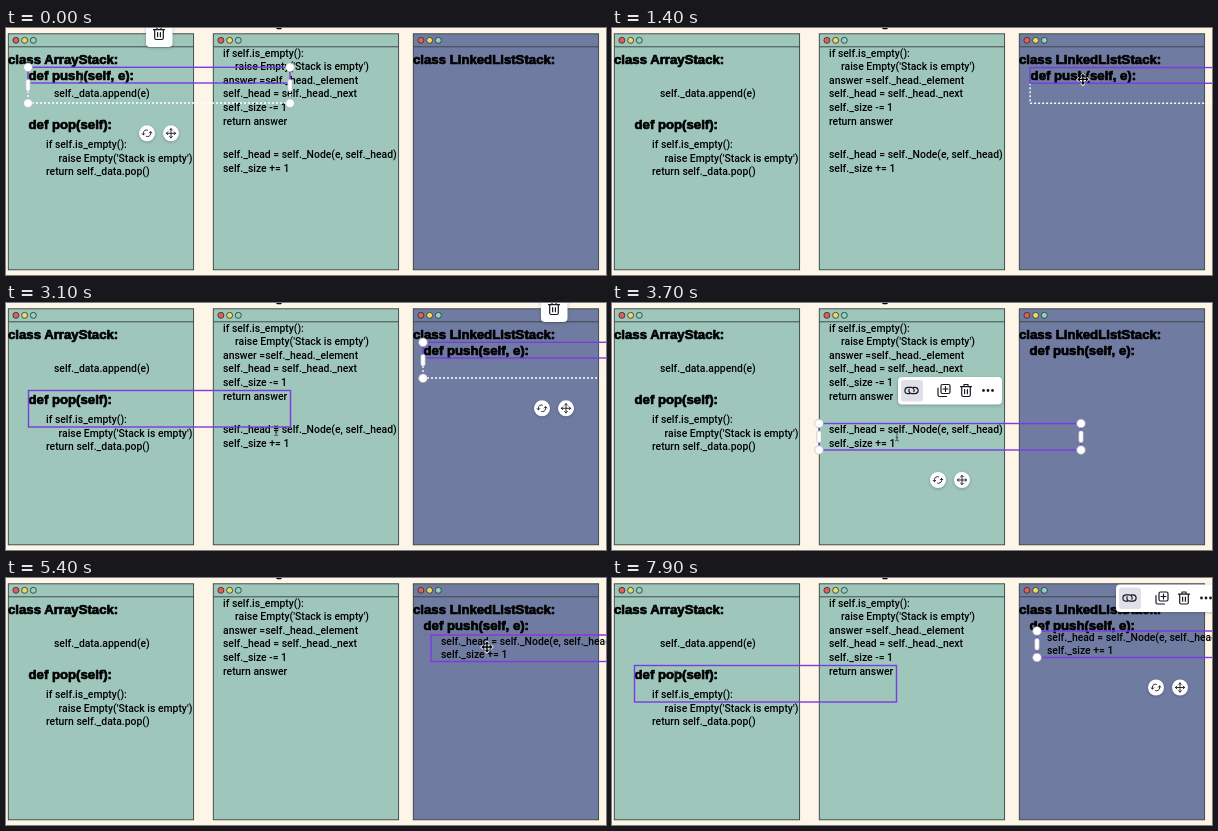
These frames come from a looping animation (600 px wide and 247 px high, 8000 ms). An HTML page:

```html
<!DOCTYPE html>
<html lang="en">
<head>
<meta charset="utf-8">
<title>Stack classes</title>
<style>
  html, body { margin: 0; width: 100%; height: 100%; overflow: hidden; background: #fdf5e8; }
  svg { display: block; width: 100vw; height: 100vh; }
  text { white-space: pre; }
  .code { font: 500 10.4px Roboto, sans-serif; fill: #000; }
  .head { font: 700 13.2px "Liberation Sans", Arial, sans-serif; fill: #000;
          stroke: #000; stroke-width: .7; stroke-linejoin: round; }
  .box { fill: none; stroke: #7a3be0; stroke-width: 1.4; }
  .dash { fill: none; stroke: #fff; stroke-width: 1.4; stroke-dasharray: 2 2; }
  .knob { fill: #fff; stroke: #a9b3b8; stroke-width: .6; }
  .guide { fill: none; stroke: #c42fc4; stroke-width: 1.1; stroke-dasharray: 2.5 1.2; }
  .card { fill: #fff; filter: drop-shadow(0 1px 1.5px rgba(30, 40, 60, .3)); }
  .icon { fill: none; stroke: #16191f; stroke-width: 1.2; stroke-linecap: round; stroke-linejoin: round; }
  .thin { stroke-width: .9; }
</style>
</head>
<body>
<svg id="stage" viewBox="0 0 600 247" preserveAspectRatio="none">
  <defs>
    <g id="trash" class="icon">
      <path d="M-5.5-3.8H5.5M-2-3.8V-6H2V-3.8M-4.3-3.8V4.5Q-4.3 6-2.8 6H2.8Q4.3 6 4.3 4.5V-3.8M-1.4-1V3.2M1.4-1V3.2"/>
    </g>
    <g id="link" class="icon">
      <path d="M-2 3.2H-3.4A3.2 3.2 0 0 1-3.4-3.2H-.4A3.2 3.2 0 0 1 2.4 1.2M2-3.2H3.4A3.2 3.2 0 0 1 3.4 3.2H.4A3.2 3.2 0 0 1-2.4-1.2"/>
    </g>
    <g id="copy" class="icon">
      <path d="M-1.5-6H4.5Q6-6 6-4.5V1.5Q6 3 4.5 3H-1.5Q-3 3-3 1.5V-4.5Q-3-6-1.5-6ZM-6-2.5V4.5Q-6 6-4.5 6H2.5M1.5-4V1M-1-1.5H4"/>
    </g>
    <g id="turn">
      <circle class="card" r="8"/>
      <path class="icon thin" d="M-3.6 1.5V-.5A3 3 0 0 1 .5-3.2M-4.8.3-3.6 1.6-2.3.3M3.6-1.5V.5A3 3 0 0 1-.5 3.2M4.8-.3 3.6-1.6 2.3-.3"/>
    </g>
    <path id="arrows" d="M-4.6 0H4.6M0-4.6V4.6M-3.2-1.4-4.6 0-3.2 1.4M3.2-1.4 4.6 0 3.2 1.4M-1.4-3.2 0-4.6 1.4-3.2M-1.4 3.2 0 4.6 1.4 3.2"/>
    <g id="shift">
      <circle class="card" r="8"/>
      <use href="#arrows" class="icon thin"/>
    </g>
  </defs>

  <rect width="600" height="247" fill="#fdf5e8"/>
  <path d="M270 0H276L275 1.2H271Z"/>
  <g id="panels"></g>
  <g id="copyText"></g>
  <rect id="hover" class="box"/>
  <g id="picks"></g>
  <path id="rowGuide" class="guide" d="M37 59.5H600"/>
  <path id="snapGuide" class="guide" d="M417 57H600" stroke-opacity=".6"/>
  <g id="cursor">
    <path id="arrow" d="M0 0V9L2 7.2 3.5 10.6 5 10 3.6 6.6H6.2Z" fill="#000" stroke="#fff" stroke-width=".5"/>
    <path id="beam" d="M-2-5Q0-5 0-3.7V3.7Q0 5-2 5M2-5Q0-5 0-3.7M0 3.7Q0 5 2 5M-1.2 1.6H1.2" fill="none" stroke="#333" stroke-width=".8"/>
    <g id="move" fill="none">
      <use href="#arrows" stroke="#fff" stroke-width="3"/>
      <use href="#arrows" stroke="#000" stroke-width="1.4"/>
    </g>
  </g>
</svg>
<script>
const LOOP = 8000, HOVER_LAG = 150;
const $ = id => document.getElementById(id);
const show = (el, on) => el.setAttribute("display", on ? "inline" : "none");
const place = (el, [x, y]) => el.setAttribute("transform", `translate(${x} ${y})`);

const TOP = 5.8, WIDE = 185.3, TALL = 236;
const panels = [[2.3, "#9fc6bb"], [207.3, "#9fc6bb"], [407.3, "#6f7ba0"]];
$("panels").innerHTML = panels.map(([x, fill]) => `
  <rect x="${x}" y="${TOP}" width="${WIDE}" height="${TALL}" fill="${fill}" stroke="#35423f" stroke-width=".9"/>
  <path d="M${x} 18.8H${x + WIDE}" stroke="#35423f" stroke-width=".9"/>` +
  ["#dd5f57", "#e6db68", "#8fd3bf"].map((dot, i) =>
    `<circle cx="${x + 7.6 + i * 8.7}" cy="12.3" r="3" fill="${dot}" stroke="#26302e" stroke-width=".8"/>`
  ).join("")).join("");

const line = (cls, x, y, s) => `<text class="${cls}" x="${x}" y="${y}">${s}</text>`;
const code = (x, y, s) => line("code", x, y, s);
const head = (x, y, s) => line("head", x, y, s);

$("copyText").innerHTML = [
  head(2, 36, "class ArrayStack:"),
  code(48, 69, "self._data.append(e)"),
  head(22.5, 101, "def pop(self):"),
  code(40, 120, "if self.is_empty():"),
  code(52.5, 133.5, "raise Empty('Stack is empty')"),
  code(40, 147, "return self._data.pop()"),
  code(217, 28.5, "if self.is_empty():"),
  code(229, 42, "raise Empty('Stack is empty')"),
  code(217, 55.5, "answer =self._head._element"),
  code(217, 69, "self._head = self._head._next"),
  code(217, 82.7, "self._size -= 1"),
  code(217, 96.5, "return answer"),
  head(407, 36, "class LinkedListStack:"),
  `<g id="push">${head(22.5, 52, "def push(self, e):")}</g>`,
  `<g id="node">${code(217, 130, "self._head = self._Node(e, self._head)")}
    ${code(217, 143.5, "self._size += 1")}</g>`
].join("");

// Selection frames: outline always, controls only while not dragging.
function controls(x, y, w, h, bar) {
  const knobs = [x, x + w].map(k => [y, y + h].map(v =>
    `<circle class="knob" cx="${k}" cy="${v}" r="4.3"/>`).join("") +
    `<rect class="knob" x="${k - 2.2}" y="${y + h / 2 - 6}" width="4.4" height="12" rx="2.2"/>`).join("");
  const mid = x + w / 2, low = y + h + 30;
  return `${knobs}<use href="#turn" x="${mid - 12}" y="${low}"/>
    <use href="#shift" x="${mid + 12}" y="${low}"/>${bar}`;
}
const pushBar = `<rect class="card" x="140" y="-8" width="26.5" height="27" rx="4"/>
  <use href="#trash" x="153" y="5.5"/>`;
const nodeBar = `<rect class="card" x="286" y="74" width="104" height="27.5" rx="4"/>
  <rect x="289" y="77" width="22" height="21.5" rx="3" fill="#dfe0ea"/>
  <use href="#link" x="299.5" y="87.5"/><use href="#copy" x="332" y="87.5"/>
  <use href="#trash" x="354" y="87.5"/>` +
  [371.5, 376, 380.5].map(x => `<circle cx="${x}" cy="87.5" r="1.4" fill="#16191f"/>`).join("");

$("picks").innerHTML = `
  <g id="pushPick"><path class="dash" d="M22 55V75H284V55"/>
    <rect class="box" x="22" y="39.3" width="262" height="15.7"/>
    <g id="pushTools">${controls(22, 39.3, 262, 36, pushBar)}</g></g>
  <g id="nodePick"><rect class="box" x="207" y="120.5" width="262" height="26.5"/>
    <g id="nodeTools">${controls(207, 120.5, 262, 26.5, nodeBar)}</g></g>`;

// Rows: time, x, y
const pushPath = [[100, 0, 0], [650, 406, 2.5], [1000, 406, 2.5], [1500, 395, 0]];
const nodePath = [[4250, 0, 0], [5150, 218, -63.5], [5450, 218, -63.5], [5650, 218, -67.5]];
const mousePath = [
  [100, 75, 50], [650, 479, 55], [1000, 479, 55], [1500, 470, 51], [2000, 470, 51],
  [2400, 190, 70], [2600, 165, 84], [2750, 165, 90], [3200, 285, 133], [3800, 285, 133],
  [4050, 263, 132], [4250, 263, 132], [5150, 481, 69], [5450, 481, 69], [5650, 481, 65],
  [6200, 481, 65], [6480, 196, 59], [6700, 192.5, 56], [7000, 150, 80], [7500, 72, 97], [7900, 64, 98]
];

function along(rows, t) {
  const next = rows.findIndex(r => r[0] > t);
  if (next === 0) return rows[0].slice(1);
  if (next < 0) return rows[rows.length - 1].slice(1);
  const a = rows[next - 1], b = rows[next];
  const u = (t - a[0]) / (b[0] - a[0]), e = u * u * (3 - 2 * u);
  return [1, 2].map(i => a[i] + (b[i] - a[i]) * e);
}

const inside = ([px, py], [x, y, w, h]) => px >= x && px <= x + w && py >= y && py <= y + h;

function draw(t) {
  const push = along(pushPath, t), node = along(nodePath, t), mouse = along(mousePath, t);
  const pushDrag = t > 50 && t < 1850, nodeDrag = t >= 4250 && t < 5680;
  const picked = t < 3250 ? "push" : "node";

  place($("push"), push);
  place($("pushPick"), push);
  place($("node"), node);
  place($("nodePick"), node);
  show($("pushPick"), picked === "push");
  show($("nodePick"), picked === "node");
  show($("pushTools"), !pushDrag);
  show($("nodeTools"), !nodeDrag);
  show($("rowGuide"), t >= 600 && t < 1050);
  show($("snapGuide"), t >= 5150 && t < 5500);

  const boxes = [
    ["node", [207 + node[0], 120.5 + node[1], 262, 26.5]],
    ["push", [22 + push[0], 39 + push[1], 262, 36]],
    ["pop", [22.5, 87.5, 262, 36.5]],
    ["mid", [207, 20, 262, 80]]
  ];
  const frames = panels.map(([x]) => ["panel", [x, TOP, WIDE, TALL]]);
  const hit = (p, list) => list.find(b => inside(p, b[1]));

  const dragging = pushDrag || nodeDrag;
  const over = hit(along(mousePath, t - HOVER_LAG), boxes.concat(frames));
  const hovering = over && !dragging && over[0] !== picked;
  show($("hover"), hovering);
  if (hovering) ["x", "y", "width", "height"].forEach((k, i) => $("hover").setAttribute(k, over[1][i]));

  const onText = hit(mouse, boxes);
  place($("cursor"), mouse);
  show($("move"), dragging);
  show($("beam"), !dragging && onText);
  show($("arrow"), !dragging && !onText);
}

const start = performance.now();
function tick() {
  draw((performance.now() - start) % LOOP);
  requestAnimationFrame(tick);
}
tick();
</script>
</body>
</html>
```
